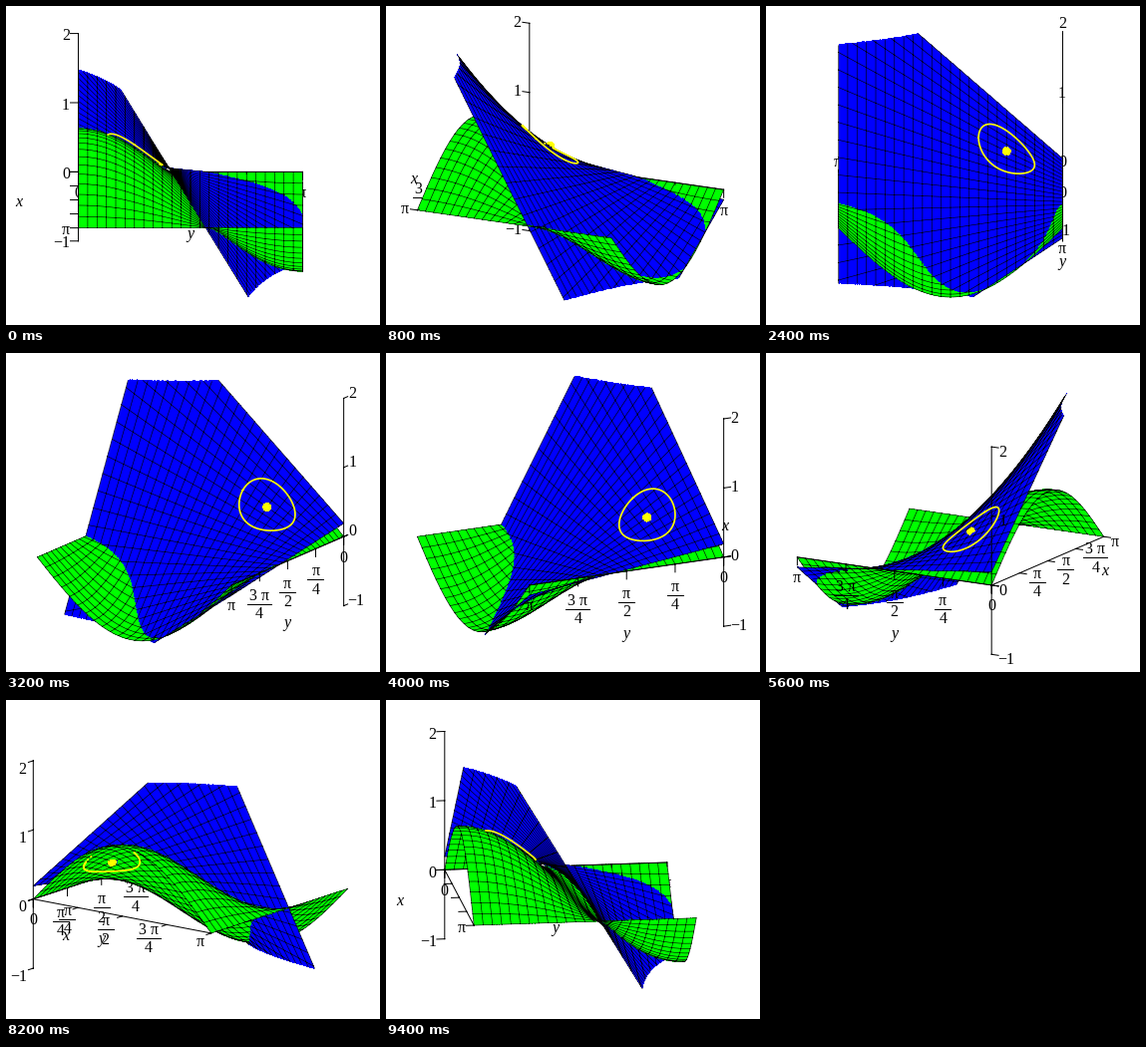
Animation of 375 by 320 pixels, one loop 9600 ms. Source, as a matplotlib script:

```python
import numpy as np
import matplotlib.pyplot as plt
from matplotlib.animation import FuncAnimation

W, H = 375, 320
FRAMES, INTERVAL = 48, 200
PI = np.pi
CX, CY = 185.0, 194.5      # screen position of the domain's centre
S, TILT, ZS = 71.6, 0.25, 69.4   # px per unit, foreshortening, px per unit of z
Z_MIN, Z_MAX = -1, 2
P0, RADIUS = PI / 4, PI / 8
GREEN, BLUE, YELLOW = 1, 2, 3
PALETTE = np.array([[0, 0, 0, 0], [0, 255, 0, 255],
                    [0, 0, 255, 255], [255, 255, 0, 255]], np.uint8)
BEHIND, FRONT = 0, 6
PX = 0.72                  # points per pixel at 100 dpi


def wave(x, y):
    return np.sin(x) * np.cos(y)


def saddle(x, y):
    u, v = x - P0, y - P0
    return 0.5 * (1 + u - v - u * v)


def project(x, y, z, a):
    """Screen x, screen y and nearness to the viewer."""
    x, y = x - PI / 2, y - PI / 2
    d = x * np.cos(a) + y * np.sin(a)
    h = y * np.cos(a) - x * np.sin(a)
    return CX + S * h, CY + S * TILT * d - ZS * z, d


COLS = np.arange(24, 347)
DEPTHS = np.linspace(-2.23, 2.23, 900)[:, None]
LEFT = (COLS + 0.5 - CX) / S


def paint(a):
    """Fill the kind and depth maps; on one sight line, larger d is nearer."""
    x = PI / 2 - LEFT * np.sin(a) + DEPTHS * np.cos(a)
    y = PI / 2 + LEFT * np.cos(a) + DEPTHS * np.sin(a)
    inside = (abs(x - PI / 2) <= PI / 2) & (abs(y - PI / 2) <= PI / 2)
    z = np.stack([wave(x, y), saddle(x, y)], axis=1)
    rows = np.floor(CY + S * TILT * DEPTHS[:, None] - ZS * z).astype(int)
    ok = inside[:, None] & (z >= Z_MIN) & (z <= Z_MAX) & (rows >= 0) & (rows < H)
    cell = (rows * W + COLS)[ok]
    ids = np.broadcast_to(np.array([GREEN, BLUE])[:, None], z.shape)[ok]
    kind = np.zeros(W * H, int)
    depth = np.full(W * H, -9.0)
    kind[cell] = ids
    depth[cell] = np.broadcast_to(DEPTHS[:, None], z.shape)[ok]
    return kind, depth


def paint_dot(kind, depth, a):
    px, py, d = project(P0, P0, 0.5, a)
    yy, xx = np.mgrid[0:H, 0:W] + 0.5
    dx, dy = xx - px, yy - py
    near = d + 0.09 + TILT * dy / S
    hit = (dx ** 2 + dy ** 2 < 4.6 ** 2).ravel() & (near.ravel() >= depth)
    kind[hit] = YELLOW


def visible(curve, a, kind, depth, bias, own=None, slack=0):
    """Project a curve and blank the parts hidden by the surfaces.

    With slack, a point also counts as seen if it is clear that many rows away,
    which keeps lines on surfaces that are viewed edge-on.
    """
    px, py, d = project(*curve, a)
    col = np.clip(np.nan_to_num(px), 0, W - 1).astype(int)
    row = np.nan_to_num(py).astype(int)
    seen = np.zeros(px.shape, bool)
    for shift in range(-slack, slack + 1):
        cell = np.clip(row + shift, 0, H - 1) * W + col
        ok = d >= depth[cell] - bias
        if own:
            ok &= (kind[cell] == own) | (kind[cell] == 0)
        seen |= ok
    return np.where(seen, px, np.nan), np.where(seen, py, np.nan)


def mesh(surface):
    t = np.append(np.linspace(0, PI, 240), np.nan)
    g, t = np.meshgrid(np.linspace(0, PI, 25), t, indexing="ij")
    x = np.concatenate([g.ravel(), t.ravel()])
    y = np.concatenate([t.ravel(), g.ravel()])
    z = surface(x, y)
    z[(z < Z_MIN) | (z > Z_MAX)] = np.nan
    return x, y, z


def segment(p, q, n):
    return np.vstack([np.linspace(p, q, n), [[np.nan] * 3]])


def axis_curves():
    tick = 8 / S
    parts = [segment((0, 0, 0), (PI, 0, 0), 300),
             segment((0, 0, 0), (0, PI, 0), 300),
             segment((0, 0, Z_MIN), (0, 0, Z_MAX), 300)]
    for k in range(5):
        s = k * PI / 4
        parts.append(segment((s, 0, 0), (s, -tick, 0), 9))
        parts.append(segment((0, s, 0), (0, s, -8 / ZS), 9))
    for z in range(Z_MIN, Z_MAX + 1):
        parts.append(segment((0, 0, z), (0, -tick, z), 9))
    return np.vstack(parts).T


fig = plt.figure(figsize=(W / 100, H / 100), dpi=100, facecolor="white")
ax = fig.add_axes([0, 0, 1, 1])
ax.set_xlim(0, W)
ax.set_ylim(H, 0)
ax.axis("off")
picture = ax.imshow(np.zeros((H, W, 4), np.uint8), extent=(0, W, H, 0),
                    interpolation="nearest", aspect="auto", zorder=2)


def stroke(color, width, z):
    return ax.plot([], [], color=color, lw=width * PX, zorder=z)[0]


meshes = [(stroke("black", 0.6, 3), mesh(wave), GREEN),
          (stroke("black", 0.6, 3), mesh(saddle), BLUE)]
axes_line, axes_curve = stroke("black", 1, 4), axis_curves()
ring_line = stroke("yellow", 1.7, 5)
turn = np.linspace(0, 2 * PI, 400)
ring_x, ring_y = P0 + RADIUS * np.cos(turn), P0 + RADIUS * np.sin(turn)
ring_curve = ring_x, ring_y, saddle(ring_x, ring_y)


class Label:
    """A word, or a fraction with a bar, centred on a point."""

    def __init__(self, point, top, bottom=None, style="normal"):
        self.point, self.bottom = point, bottom
        self.extra = 4 if top == "−1" else 2 if len(top) > 1 else 0
        self.bar = stroke("black", 1, FRONT)
        self.half = 12 if len(top) > 1 else 8
        self.texts = [ax.text(0, 0, t, family="Liberation Serif", style=style,
                              size=16 * PX, ha="center", va="baseline")
                      for t in (top, bottom) if t]

    def place(self, x, y, front, shown=True):
        drops = (-4, 14.5) if self.bottom else (5.3,)
        for text, drop in zip(self.texts, drops):
            text.set_position((x, y + drop))
        if self.bottom:
            self.bar.set_data([x - self.half, x + self.half], [y, y])
        for artist in self.texts + [self.bar]:
            artist.set_zorder(FRONT if front else BEHIND)
            artist.set_visible(shown)


FRACTIONS = [(1, "π", "4"), (2, "π", "2"), (3, "3 π", "4"), (4, "π", None)]
x_labels = [Label((k * PI / 4, 0, 0), t, b) for k, t, b in FRACTIONS]
y_labels = [Label((0, k * PI / 4, 0), t, b) for k, t, b in FRACTIONS]
y_labels.append(Label((0, 0, 0), "0"))
z_labels = [Label((0, 0, z), t) for z, t in ((-1, "−1"), (0, "0"), (1, "1"), (2, "2"))]
x_name = Label((PI / 2, 0, 0), "x", style="italic")
y_name = Label((0, PI / 2, 0), "y", style="italic")


def outward(a, k):
    """Unit screen direction that leads away from the y = 0 side."""
    v = np.array([-np.cos(a), -k * np.sin(a)])
    return v / np.hypot(*v)


def place_labels(a):
    x_front, y_front = np.sin(a) < -1e-9, np.cos(a) < -1e-9
    ux, uy = outward(a, 0.45)
    for label in x_labels + z_labels:
        px, py, _ = project(*label.point, a)
        reach, drop = (19, 4) if label.bottom else (12, 1.3)
        roomy = not label.bottom or abs(np.sin(a)) * S * PI / 4 > 18
        label.place(px + ux * (reach + label.extra) - 0.5,
                    py + uy * reach + drop, x_front, roomy)
    for label in y_labels:
        px, py, _ = project(*label.point, a)
        roomy = not label.bottom or abs(np.cos(a)) * S * PI / 4 > 18
        label.place(px - 0.2, py + (31 if label.bottom else 20), y_front, roomy)
    ux, uy = outward(a, TILT)
    px, py, _ = project(*x_name.point, a)
    x_name.place(px + 59 * ux - 1, py + 59 * uy + 1, x_front)
    px, py, _ = project(*y_name.point, a)
    y_name.place(px - 0.2, py + 61.5, y_front)


def draw(i):
    a = 2 * PI * i / FRAMES
    kind, depth = paint(a)
    paint_dot(kind, depth, a)
    picture.set_data(PALETTE[kind].reshape(H, W, 4))
    for line, curve, own in meshes:
        line.set_data(*visible(curve, a, kind, depth, 0.15, own, slack=1))
    axes_line.set_data(*visible(axes_curve, a, kind, depth, 0.05))
    ring_line.set_data(*visible(ring_curve, a, kind, depth, 0.08, slack=1))
    place_labels(a)
    return []


anim = FuncAnimation(fig, draw, frames=FRAMES, interval=INTERVAL,
                     init_func=lambda: [], repeat=True, repeat_delay=0)
plt.show()
```
